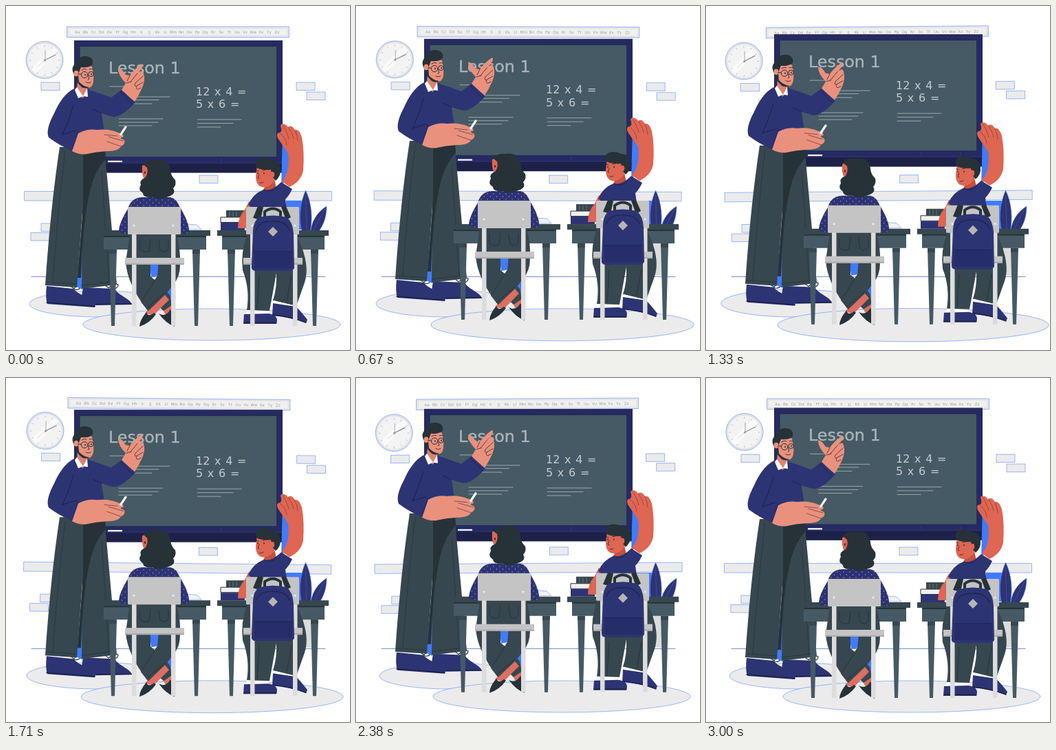
An HTML page that plays this animation: 500 px wide and 500 px high, repeating every 3040 ms.

```html
<!DOCTYPE html>
<html lang="en">
<head>
<meta charset="utf-8">
<title>Lesson 1</title>
<style>
  html, body { margin: 0; width: 100%; height: 100%; overflow: hidden; background: #fff; }
  svg { display: block; width: 100vw; height: 100vh; }
  text { font-family: "DejaVu Sans", sans-serif; }
  .halo { stroke: #5b8cff; stroke-width: .6; }
  .line { fill: none; stroke-linecap: round; stroke-linejoin: round; }
  .sum { word-spacing: .1em; }
</style>
</head>
<body>
<svg id="stage" viewBox="0 0 500 500">
  <defs>
    <pattern id="dots" width="9" height="8" patternUnits="userSpaceOnUse">
      <rect width="9" height="8" fill="#2c3273"/>
      <circle cx="2" cy="2" r=".7" fill="#a9acd0"/>
      <circle cx="6.5" cy="6" r=".7" fill="#a9acd0"/>
    </pattern>
  </defs>
</svg>
<script>
const LOOP = 3040, BEAT = 1500;
const navy = '#2d3474', deep = '#1d2148', frame = '#252b61', ink = '#263238', slate = '#37474f',
  board = '#455a64', pale = '#ebebeb', chalk = '#aab4b9', blue = '#407bff',
  skin = '#e9917d', tan = '#de6652', steel = '#c4c4c4', leg = '#dcdcdc';

const path = (d, fill, extra = '') => `<path d="${d}" fill="${fill}" ${extra}/>`;
const line = (d, color, width = 1) =>
  `<path class="line" d="${d}" stroke="${color}" stroke-width="${width}"/>`;
const rect = (x, y, w, h, fill, extra = '') =>
  `<rect x="${x}" y="${y}" width="${w}" height="${h}" fill="${fill}" ${extra}/>`;
const oval = (x, y, rx, ry, fill, extra = '') =>
  `<ellipse cx="${x}" cy="${y}" rx="${rx}" ry="${ry}" fill="${fill}" ${extra}/>`;
const text = (x, y, size, fill, words, extra = '') =>
  `<text x="${x}" y="${y}" font-size="${size}" fill="${fill}" ${extra}>${words}</text>`;
const halo = 'class="halo"';

function floor() {
  return oval(135.5, 433, 101.5, 19, pale, halo) + oval(299, 463, 187, 23, pale, halo);
}

function clock() {
  let ticks = '';
  for (let i = 0; i < 12; i++) {
    const a = i * Math.PI / 6, c = Math.cos(a), s = Math.sin(a);
    ticks += `M${56 + 20 * c} ${79 + 20 * s}L${56 + 22 * c} ${79 + 22 * s}`;
  }
  return oval(56, 78.5, 27, 27, '#e2e2e2', halo) + oval(56, 78.5, 24, 24, '#f3f3f3') +
    path('M36 91L69 59L75 65L43 98Z', '#fafafa') + line(ticks, '#bbb', .9) +
    line('M57 79V65', '#b8b8b8', 1.3) + line('M56 79L72 71', '#8d8d8d', 1.3) +
    line('M56 79L46 88', '#ccc', .7) + oval(56.5, 79, 1.6, 1.6, '#999');
}

function wall() {
  const bricks = [[51, 111], [422, 111], [437, 125], [281, 246], [51, 316], [36, 329.5]];
  const letters = [...'ABCDEFGHIJKLMNOPQRSTUVWXYZ'].map((c, i) =>
    text(104 + i * 11.6, 40, 5.6, '#a0a0a0', c + c.toLowerCase(), 'text-anchor="middle"'));
  return rect(26.5, 269.5, 447, 13.5, pale, halo) +
    bricks.map(([x, y]) => rect(x, y, 27, 11.5, pale, halo)).join('') +
    rect(88.5, 30, 323, 15.5, '#e6e6e6', halo) + rect(92, 33, 316, 9.5, '#f0f0f0') +
    letters.join('') + clock();
}

function blackboard() {
  const left = [[117, 151, 174], [132, 164, 238], [136.5, 164, 222], [142, 164, 212],
    [164, 164, 228], [169, 164, 221], [174, 164, 212]];
  const right = [[165, 278, 342], [170.5, 278, 330], [176, 278, 312]];
  const rules = [...left, ...right].map(([y, a, b]) => `M${a} ${y}H${b}`).join('');
  return rect(99, 50, 303, 179, frame) + rect(107, 58.5, 286, 160.5, board) +
    line('M107 219.5V58.5H394', '#1e2451', 1) +
    rect(130, 228, 279, 14.5, deep) + rect(130, 227, 279, 2, '#2a306a') +
    rect(148, 224.8, 21, 2.2, '#fff') +
    line('M313 226V222M370 226V222', '#363d80', 1) +
    text(149, 98, 23.8, chalk, 'Lesson 1', `stroke="${chalk}" stroke-width=".4"`) +
    text(276, 129.5, 16, '#c3cbcf', '12 x 4 =', 'class="sum"') +
    text(276, 148, 16, '#c3cbcf', '5 x 6 =', 'class="sum"') +
    line(rules, '#9aa6ac', 1);
}

function plant() {
  return path('M427 334H452L446 392H434Z', leg) +
    path('M407 283H430V325H424V296H407Z', blue) +
    path('M432 334C423 308 429 283 435.5 268C444 285 447 309 441 334Z', navy, halo) +
    path('M442 334C443 313 452 300 466 291C466 309 460 323 449 334Z', navy, halo) +
    line('M435.5 275L437 330M463 295L445 330', '#4a519b', .8);
}

function teacher() {
  const shoes =
    path('M59 407L98 411C107 421 126 426 130 433L129 438L60 433Q57 423 59 407Z', navy) +
    path('M112 409L158 411C163 421 181 425 183 434L130 435Q112 429 110 422Z', navy) +
    line('M59 431L129 436.5M131 433.5L182 433', deep, 1.5) +
    line('M82 407q8 -4 17 4q6 -9 10 -4q-2 7 -10 5M132 407q10 -5 17 3q8 -8 14 -5q0 7 -12 6', ink, 1.1);
  const trousers =
    path('M112 300H114L111 412L102 408Z', blue) +
    path('M78 205H143L153 315L161 405L110 411L111 300L103 409L57 406Q65 290 78 205Z', slate) +
    path('M112 208H144L145 222Q129 240 123 265Q113 305 110 370L109 395L104 395L112 290Z', ink) +
    line('M86 211Q75 300 68 401M139 240L150 403M59 401L103 404M110 406L160 400', '#263840', .9);
  const torso =
    path('M101 119C84 127 76 143 70 156Q57 180 62 191Q78 203 97 211L144 210L143 183L139 157L121 121Z', navy) +
    line('M98 144Q91 168 82 187M82 187L101 181', deep, 1) +
    path('M117 122C128 123 141 129 153 133L169 121L188 140Q169 161 156 161Q142 158 126 150Z', navy) +
    line('M166 124L184 143M126 150L139 156', deep, .9) +
    path('M104 181L115 187L104 211L95 210Z', '#262d68');
  const head =
    path('M104 109L118 111L118 128L111 134L103 121Z', '#dc826f') +
    path('M103 118L112 131L105 134L100 122Z', '#fff') + path('M118 120L119 132L112 131Z', '#fff') +
    path('M102 91Q110 82 125 88L127 98Q129 119 119 119Q107 119 104 110Z', skin) +
    path('M98 98Q94 89 101 83Q105 72 116 73Q128 74 126 85Q121 90 109 89L105 99L106 110Q112 117 121 118Q116 121 110 118Q102 111 101 103Z', ink) +
    oval(102, 98, 3.4, 4.3, skin) +
    `<g fill="none" stroke="${ink}" stroke-width="1"><circle cx="114" cy="100" r="4.6"/><circle cx="123.5" cy="99" r="3.6"/><path d="M104 99L109 99"/></g>` +
    oval(115, 100, .9, 1.3, ink) + oval(124, 99, .9, 1.3, ink) +
    line('M110 93q4 -3 7 -1M121 92q3 -1 5 0M119 101l2 5l-2 1M116 111q4 2 7 0', ink, .9);
  const raised =
    path('M168 122L174 112Q163 101 163 91Q167 89 174 100L180 101Q188 90 198 84Q202 87 191 98Q199 91 200 98Q203 107 198 119Q193 130 187 139L180 133Z', skin) +
    line('M180 101L176 109M191 98L181 110M199 102L188 112Q186 118 190 116L199 111M175 112L182 110M190 117Q188 121 192 121L196 119', '#4e3434', .9);
  const low =
    path('M105 185Q119 178 132 180Q150 178 163 184Q173 186 170 191L162 190L172 195Q174 201 167 204Q164 211 147 211Q130 212 118 215Q108 217 96 211Z', skin) +
    line('M164 191L174 176', '#fff', 3.2) +
    path('M153 185L165 187Q170 190 166 193L157 193Z', skin) +
    line('M149 190L170 196M147 197L167 204M143 187L162 189', '#6d403a', .8);
  return shoes + trousers + torso + head + raised + low;
}

function desk(x) {
  return [15, 136].map(d =>
    path(`M${x + d} 354h11l-3 111h-5Z`, board) + rect(x + d, 354, 10.5, 6, slate)).join('') +
    rect(x + 7, 333, 149, 21, board) + rect(x, 326, 162, 8, slate) +
    rect(x + 7, 334, 149, 2, ink);
}

function deskItems() {
  return path('M262 325L264 317L277 318L284 325Z', '#f2f2f2', halo) +
    rect(320, 297, 27, 10, slate) + line('M325 299V306M330 299V306M335 299V306', '#60747d', 1) +
    rect(311, 307, 38, 8, '#f1f1f1') + line('M349 307H312V314.5H349', ink, 1) +
    rect(312, 315, 35, 11, navy);
}

// Seat, back and posts; x is the left edge of the back.
function chair(x, width, posts) {
  return posts.map(p => rect(p, 331, 6.5, 134, leg)).join('') +
    rect(x - 4, 366, width + 9, 10, steel) + rect(x - 4, 374, width + 9, 2, '#aaa') +
    rect(x, 292, width, 40, steel, 'rx="1.5"') +
    posts.map(p => oval(p + 3, 319, 1.5, 1.5, '#eee')).join('');
}

function girl() {
  return path('M208 372H223V392L211 394ZM230 420L246 398V446H236Z', blue) +
    path('M231 418L237 426L214 450L202 446ZM227 440L239 433L243 448L234 452Z', '#dc6f62') +
    path('M180 331H247Q254 350 253 376Q253 394 243 405L231 421L207 444L196 430Q207 411 220 393L222 370H210L210 393Q222 402 238 420L241 435L229 443L218 433L207 444Q176 405 174 372Z', slate) +
    line('M194 340V353Q200 360 208 356L210 339M222 340L224 355Q231 360 236 353V340M197 429L220 393M204 440L231 417', ink, .9) +
    path('M231 420L237 427L214 450L206 444Z', '#dc6f62') +
    path('M194 466Q194 457 204 445Q207 453 215 446L218 448Q209 461 194 466ZM222 447Q232 453 239 441Q245 452 245 466Q232 461 222 447Z', ink) +
    path('M196 278Q181 280 177 295Q165 314 164 326Q167 333 178 331L188 310H246L257 331Q267 333 266 325Q265 312 252 291Q248 280 239 278Z', 'url(#dots)') +
    path('M198 232Q197 243 200 250L209 250V228Z', tan) + oval(202, 242, 1, 2, ink) +
    path('M199 230Q206 222 217 224Q236 221 239 238Q239 246 246 253Q248 260 243 265Q248 273 236 277Q224 283 213 278Q199 279 199 272Q191 267 196 260Q193 253 203 249Q207 242 205 235Z', ink) +
    chair(177, 77, [183, 240]);
}

function boy() {
  const armAndHead =
    path('M402 186L412 200V240L400 264Z', blue) +
    path('M400 172Q406 170 410 176Q415 172 420 180Q426 178 430 191Q434 211 432 239Q429 255 412 263L401 255Q413 242 410 214Q403 204 395 192Q392 184 398 184Q402 182 399 174Z', tan) +
    line('M403 174Q409 185 411 193M411 177Q417 186 418 193M420 181Q424 189 424 196M398 185Q407 191 408 202', '#923e34', .8) +
    path('M379 255L390 251L394 270L374 268Z', '#c6503f') +
    path('M365 231H390V254Q382 265 372 263Q363 261 363 247Z', tan) +
    path('M364 235Q360 225 368 222Q376 219 386 224Q397 224 399 237Q400 247 392 254L387 248L385 238Q373 239 364 235Z', ink) +
    oval(387, 245, 3.3, 4.3, tan) +
    line('M364 239l3 1M373 239l4 -1M368 245l-2 5l2 1M369 257q3 1 5 -1', ink, .9) +
    oval(366, 243, .8, 1.3, ink) + oval(375, 243, .8, 1.3, ink);
  const body =
    path('M353 284L369 291L351 323L337 323Q337 307 347 296Z', tan) +
    path('M352 289Q359 273 374 267Q386 270 400 256L416 266Q412 275 406 281L413 330H358L361 296Z', navy) +
    line('M375 267Q384 273 394 264', deep, 1);
  const legs =
    path('M350 333H421Q430 347 433 360Q440 384 434 402L422 436L388 428Q394 410 393 388L383 443L350 442Q355 412 344 384Q341 358 350 333Z', slate) +
    path('M350 442L382 444L380 449L349 447ZM389 428L421 436L419 440L387 433Z', '#fff') +
    path('M346 448L381 447Q394 449 394 457L393 462H345ZM388 432L422 437Q432 448 438 456L436 461Q414 452 387 450Z', navy) +
    line('M346 460.5H393M388 449Q412 451 436 460', deep, 1.3) +
    line('M368 392L365 440M415 392L408 430', ink, .9);
  const bag =
    path('M359 308L366 291L374 292L370 311ZM400 292L407 291L414 307L407 311Z', ink) +
    line('M376 308V299Q388 290 399 299V308', ink, 4) +
    path('M368 307Q388 302 408 307Q417 314 418 331L419 381Q417 385 411 385H362Q356 384 357 378L359 326Q360 312 368 307Z', navy) +
    path('M361 358H416V381H361Z', '#272d68') + line('M361 357H416M364 326Q367 313 386 313Q407 312 412 326', deep, 1.1) +
    path('M388 321L395 328L388 335L381 328Z', '#b5b5b5');
  return armAndHead + body + legs + chair(349, 77, [355, 417]) + bag;
}

const stage = document.getElementById('stage');
const group = (id, content) => `<g id="${id}">${content}</g>`;
stage.insertAdjacentHTML('beforeend',
  group('floor', floor()) + line('M37 393.5H464', '#5875b8', .8) +
  group('wall', wall()) + group('board', blackboard()) + plant() +
  group('class', teacher() + desk(135) + desk(307) + deskItems() + girl() + boy()));

const part = id => document.getElementById(id);
const [floorPart, wallPart, boardPart, classPart] = ['floor', 'wall', 'board', 'class'].map(part);

function between(keys, t) {
  const i = keys.findIndex(([time]) => time > t);
  if (i < 0) return keys[keys.length - 1][1];
  const [t0, v0] = keys[i - 1], [t1, v1] = keys[i];
  return v0 + (v1 - v0) * (t - t0) / (t1 - t0);
}

const lift = t => between([[0, 0], [.5, -10], [1, 0]], t % BEAT / BEAT);
const sway = t => between([[0, 0], [.25, 1], [.75, -1], [1, 0]], t % BEAT / BEAT);
const pulse = t => between([[0, 1], [300, 1.095], [780, 1], [1170, 1], [1470, 1.1], [1765, 1], [LOOP, 1]], t);

function draw(t) {
  const s = pulse(t);
  classPart.setAttribute('transform', `translate(0 ${lift(t)})`);
  boardPart.setAttribute('transform', `translate(0 ${lift(Math.max(0, t - 500))})`);
  wallPart.setAttribute('transform', `rotate(${sway(t)} 250 186)`);
  floorPart.setAttribute('transform', `translate(260 450) scale(${s}) translate(-260 -450)`);
}

const start = performance.now();
function tick() {
  draw((performance.now() - start) % LOOP);
  requestAnimationFrame(tick);
}
tick();
</script>
</body>
</html>
```
